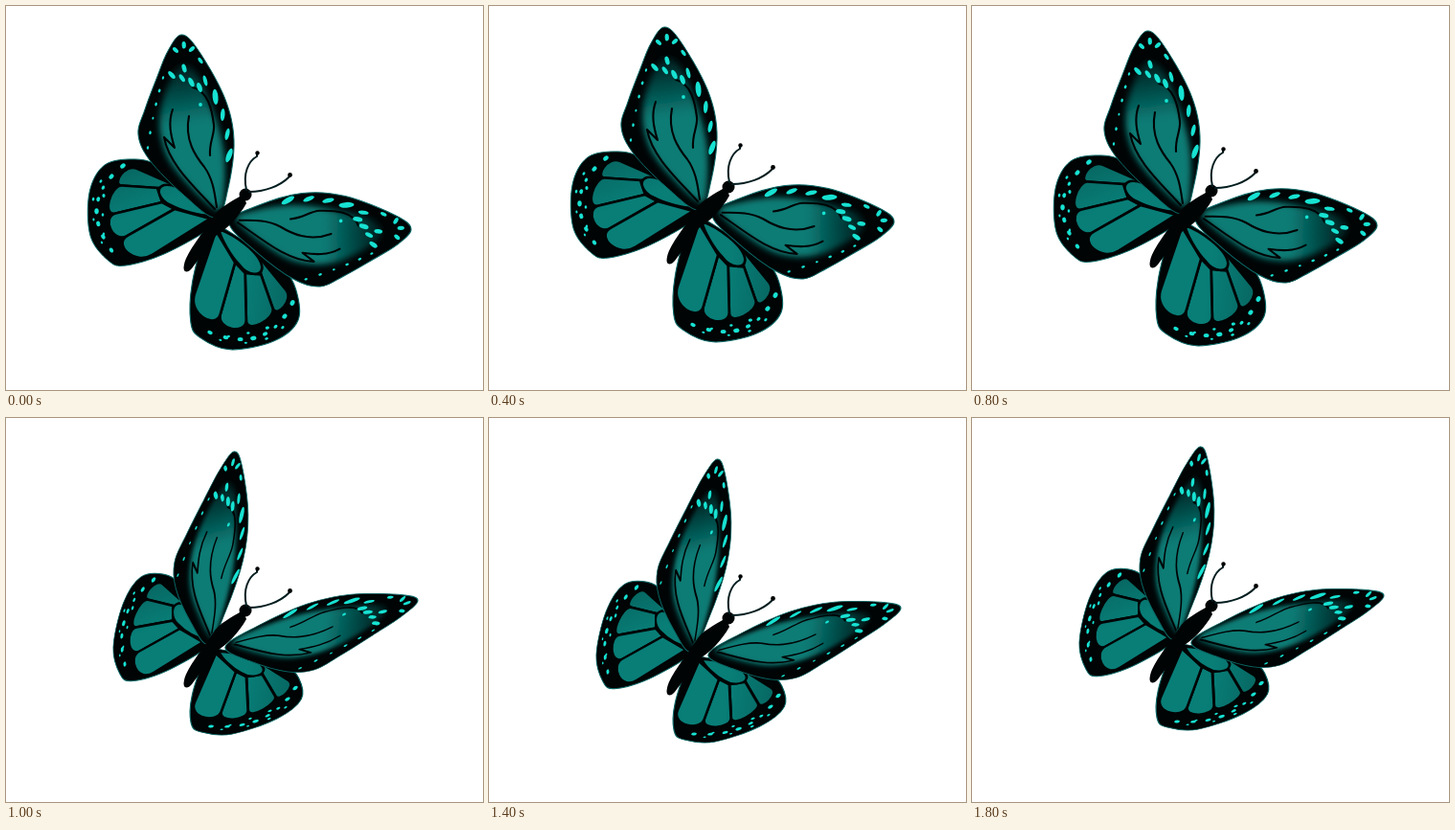
Write an HTML page that moves like this. It is 498 px wide and 401 px high and loops after 2000 ms.

```html
<!DOCTYPE html>
<html lang="en">
<head>
<meta charset="utf-8">
<title>Butterfly</title>
<style>
  html, body { margin: 0; width: 100%; height: 100%; overflow: hidden; background: #fff; }
  svg { display: block; width: 498px; height: 401px; }
  .wing { fill: #000405; stroke: #0a6b68; stroke-width: 1; }
  .glow { fill: url(#fade); filter: url(#soft); }
  .cell { fill: url(#teal); stroke: #000405; stroke-width: 2.6; stroke-linejoin: round; }
  .vein { fill: none; stroke: #000405; stroke-width: 2.1; stroke-linecap: round; stroke-linejoin: round; }
  .spot { fill: #17e2d2; }
  .body { fill: #000405; }
  .feeler { fill: none; stroke: #021d1f; stroke-width: 2; stroke-linecap: round; }
</style>
</head>
<body>
<svg id="stage" viewBox="0 0 498 401"></svg>
<script>
const STEP = 200;
const LIFT = [0, -6, -8, -12, -4, 4, 8, 12, 11, -1];

// Where root, tip and corner of each wing lie; the first set is the drawn shape.
const FORE = {
  open: [[219, 218, 183, 30, 138, 134], [236, 226, 423, 233, 328, 293]],
  folded: [[212, 229, 238, 31, 176, 146], [232, 234, 430, 187, 322, 259]]
};
const HIND = {
  open: [[214, 219, 122, 167, 110, 255], [222, 233, 299, 310, 213, 341]],
  folded: [[207, 227, 154, 165, 124, 253], [222, 240, 302, 278, 214, 318]]
};

let seed = 7;
const random = () => (seed = seed * 16807 % 2147483647) / 2147483647;
const mix = (a, b, t) => a.map((v, k) => v + (b[k] - v) * t);
const path = (cls, d) => `<path class="${cls}" d="${d}"/>`;

// Smooth closed path through points.
function loop(p) {
  const n = p.length / 2;
  const at = i => { i = (i + n) % n; return [p[2 * i], p[2 * i + 1]]; };
  let d = `M${at(0)}`;
  for (let i = 0; i < n; i++) {
    const [a, b, c, e] = [at(i - 1), at(i), at(i + 1), at(i + 2)];
    const c1 = b.map((v, k) => v + (c[k] - a[k]) / 6);
    const c2 = c.map((v, k) => v - (e[k] - b[k]) / 6);
    d += `C${c1} ${c2} ${c}`;
  }
  return d + 'Z';
}

// Spots spread along a quadratic curve, turned against its direction.
function row(a, b, c, n, long, wide, turn = 0) {
  let out = '';
  for (let i = 0; i < n; i++) {
    const t = i / (n - 1);
    const p = mix(a, b, t), q = mix(b, c, t);
    const angle = Math.atan2(q[1] - p[1], q[0] - p[0]) * 180 / Math.PI + turn;
    const size = .8 + .4 * random();
    out += `<ellipse class="spot" rx="${long * size}" ry="${wide * size}" transform="translate(${mix(p, q, t)}) rotate(${angle})"/>`;
  }
  return out;
}

// A cell with a rounded outer end between two veins.
function cell([a, b], [c, d]) {
  return path('cell', `M${a}L${mix(a, b, .82)}C${mix(a, b, 1.08)} ${mix(c, d, 1.08)} ${mix(c, d, .82)}L${c}Z`);
}

function foreWing() {
  const edge = loop([183,30, 169,47, 157,76, 145,108, 138,134, 150,161, 185,197, 219,221,
    232,190, 238,140, 228,95, 200,45]);
  const glow = loop([221,213, 188,184, 166,152, 161,112, 178,66, 197,68, 216,110, 227,150, 228,192]);
  return `<clipPath id="rim"><path d="${edge}"/></clipPath>` + path('wing', edge) +
    `<g clip-path="url(#rim)">${path('glow', glow)}</g>` +
    path('vein', 'M174 108C169 122 172 135 176 148L165 137C170 165 196 188 218 212') +
    path('vein', 'M191 115C186 140 198 157 207 168C217 182 218 198 220 210') +
    path('vein', 'M195 85C211 89 215 108 217 124C218 135 212 141 213 156') +
    row([208, 78], [232, 110], [233, 156], 5, 7, 2.5, 22) +
    row([173, 72], [190, 76], [202, 85], 4, 4.8, 2.3, 35) +
    row([177, 46], [186, 36], [194, 45], 3, 3.5, 2, 90) +
    row([186, 65], [196, 62], [203, 57], 2, 4, 2, 90) +
    row([164, 75], [154, 108], [148, 148], 6, 1.8, 1.2) +
    '<circle class="spot" cx="203" cy="103" r="1.9"/>';
}

function hindWing() {
  const edge = loop([160,167, 135,160, 103,166, 87,195, 88,240, 107,266, 125,271, 165,259,
    212,233, 219,220, 185,188]);
  const veins = [
    [[176, 187], [128, 166]],
    [[158, 190], [113, 187]],
    [[163, 205], [104, 219]],
    [[176, 212], [116, 246]],
    [[213, 222], [140, 268]]
  ];
  return path('wing', edge) +
    veins.slice(1).map((v, i) => cell(veins[i], v)).join('') +
    path('cell', 'M214 219C205 205 180 184 165 187C155 190 160 203 172 208C185 215 203 219 214 219Z') +
    row([122, 167], [74, 205], [110, 255], 8, 2.6, 1.9) +
    row([99, 183], [81, 209], [100, 247], 4, 1.6, 1.1) +
    row([102, 198], [100, 218], [102, 238], 3, 1.8, 1.4);
}

const body =
  path('body', 'M247 197C236 204 221 211 216 221C206 237 189 256 186 270C184 278 189 280 194 274C202 264 210 250 219 240C232 232 243 220 251 206Z') +
  '<circle class="body" cx="250" cy="197" r="6.5"/>' +
  path('feeler', 'M251 192C247 175 253 162 262 157L262 153') +
  path('feeler', 'M254 194C270 194 286 188 295 179L297 176') +
  '<circle class="body" cx="262.5" cy="153.5" r="2.2"/><circle class="body" cx="296.5" cy="176.5" r="2.4"/>';

const axes = ([x, y, x1, y1, x2, y2]) => new DOMMatrix([x1 - x, y1 - y, x2 - x, y2 - y, x, y]);

function place(id, wing, pose) {
  const home = axes(wing.open[0]).inverse();
  return wing[pose].map(p => `<use href="#${id}" transform="${axes(p).multiply(home)}"/>`).join('');
}

const pose = name => `<g class="pose">${place('hind', HIND, name)}${place('fore', FORE, name)}</g>`;

const stage = document.getElementById('stage');
stage.innerHTML = `
  <defs>
    <linearGradient id="fade" gradientUnits="userSpaceOnUse" x1="188" y1="62" x2="196" y2="122">
      <stop offset="0" stop-color="#021c1c"/><stop offset="1" stop-color="#087b75"/>
    </linearGradient>
    <linearGradient id="teal" gradientUnits="userSpaceOnUse" x1="120" y1="165" x2="140" y2="215">
      <stop offset="0" stop-color="#07645f"/><stop offset="1" stop-color="#087e77"/>
    </linearGradient>
    <filter id="soft"><feGaussianBlur stdDeviation="3"/></filter>
    <g id="fore">${foreWing()}</g>
    <g id="hind">${hindWing()}</g>
  </defs>
  <g id="fly">${pose('open')}${pose('folded')}${body}</g>`;

const fly = document.getElementById('fly');
const poses = stage.querySelectorAll('.pose');
const start = performance.now();

function draw() {
  const i = Math.floor((performance.now() - start) / STEP) % LIFT.length;
  fly.setAttribute('transform', `translate(0 ${LIFT[i]})`);
  poses.forEach((g, k) => g.setAttribute('display', i % 2 === k ? 'inline' : 'none'));
  requestAnimationFrame(draw);
}
draw();
</script>
</body>
</html>
```
